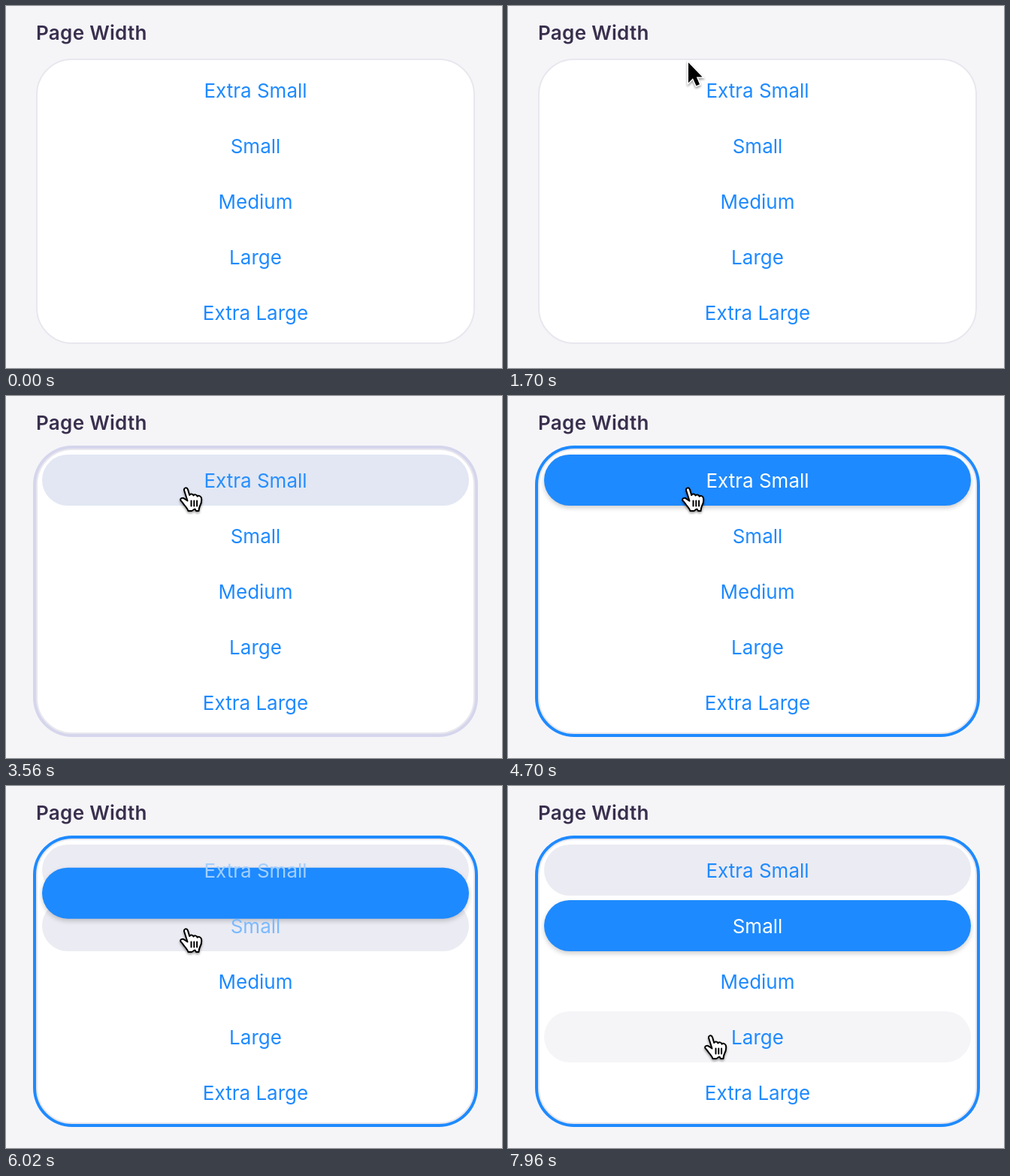
Write an HTML page that moves like this. It is 660 by 482 pixels and loops after 8 s.

```html
<!DOCTYPE html>
<html lang="en">
<head>
<meta charset="utf-8">
<title>Page Width</title>
<style>
html, body { margin: 0; width: 100%; height: 100%; overflow: hidden; background: #f5f5f8; }
body { position: relative; font: 26px/68px Inter, sans-serif; }
h1 { position: absolute; left: 40px; top: 2px; margin: 0; font-size: 26px; font-weight: 600; letter-spacing: .3px; color: #392f4d; white-space: nowrap; }
#panel { position: absolute; left: 40px; top: 70px; width: 584px; height: 380px; box-sizing: border-box; background: #fff; border: 2px solid #e8e7ee; border-radius: 48px; }
.row, .label, #pill { position: absolute; left: 48px; width: 568px; height: 68px; border-radius: 34px; text-align: center; }
#pill { top: 78px; background: #1e8aff; box-shadow: 0 3px 6px rgba(0, 0, 0, .2); }
svg { position: absolute; left: 0; top: 0; }
#cursor { filter: drop-shadow(0 2px 1.5px rgba(0, 0, 0, .4)); }
</style>
</head>
<body>
<h1>Page Width</h1>
<div id="panel"></div>
<svg width="660" height="482">
  <g id="cursor">
    <path id="arrow" d="M1 2V29L7 23 11.5 33 16 31 11.8 21.3H19.5Z" fill="#000" stroke="#fff" stroke-width="3" paint-order="stroke"/>
    <g id="hand" transform="translate(-8)" stroke="#000" stroke-width="2" stroke-linejoin="round" stroke-linecap="round">
      <path fill="#fff" d="M10.5 18.5L6.2 5C5 1 9.7-.2 11 3.5L13.2 11C14 8.8 17.8 9 18.4 11.5C19.6 9.6 23 10 23.6 12.7C25 11 28.5 12 29 15C29.7 19 29 22 27 25.5C25.8 28 25.8 29.5 25.5 32H22L20.5 29.5C18.5 29.5 17.5 32 16 32H11.5C11 29.5 9 27.5 7 25C5 22.5 3.5 20 1.5 18.2C0 15.5 4 13.5 6.2 15.7Z"/>
      <path fill="none" d="M15.5 18.5v7M19.3 18.5v7M23.1 18.5v7"/>
    </g>
  </g>
</svg>
<script>
const LOOP = 8000, PITCH = 74, BLUE = '#1e8aff';
const $ = id => document.getElementById(id);
const svg = document.querySelector('svg');

function add(cls, top, text = '') {
  const el = document.createElement('div');
  el.className = el.id = cls;
  if (cls !== 'pill') el.removeAttribute('id');
  el.style.top = top + 'px';
  el.textContent = text;
  svg.before(el);
  return el;
}
const names = ['Extra Small', 'Small', 'Medium', 'Large', 'Extra Large'];
const rows = names.map((_, i) => add('row', 78 + i * PITCH));
const pill = add('pill', 78);
const labels = names.map((name, i) => add('label', 79 + i * PITCH, name));

// Pointer tip: time, x, y
const path = [
  [1180, 239, -38], [1700, 239, 73], [2000, 239, 104], [2480, 239, 114],
  [2600, 239, 119], [2810, 239, 119], [2840, 239, 121], [4690, 239, 121],
  [5200, 239, 189], [6710, 239, 189], [7060, 246, 219], [7540, 267, 325],
  [7960, 269, 331]
];
// Pointer over each row: enter, leave, press
const visits = [[1720, 9e3, 3440], [4930, 7060, 5820], [7100, 7380, 9e3], [7410, 9e3, 9e3]];
const FIRST_PICK = 3540, SECOND_PICK = 5920;

const clamp = v => Math.min(1, Math.max(0, v));
const ramp = (t, start, length) => clamp((t - start) / length);

// The CSS "ease" curve
function ease(x) {
  let lo = 0, hi = 1;
  for (let i = 0; i < 20; i++) {
    const s = (lo + hi) / 2;
    if (.75 * s * (1 - s) + s ** 3 < x) lo = s; else hi = s;
  }
  return .3 * lo * (1 - lo) ** 2 + 3 * lo * lo * (1 - lo) + lo ** 3;
}

function slope(i, k) {
  if (i < 1 || i > path.length - 2) return 0;
  const rate = j => (path[j + 1][k] - path[j][k]) / (path[j + 1][0] - path[j][0]);
  const a = rate(i - 1), b = rate(i);
  return a * b > 0 ? 2 * a * b / (a + b) : 0;
}

// Smooth interpolation without overshoot
function pointer(t, k) {
  const last = path.length - 1;
  if (t >= path[last][0]) return path[last][k];
  const i = Math.max(0, path.findIndex(p => p[0] > t) - 1);
  const a = path[i], b = path[i + 1], d = b[0] - a[0], s = ramp(t, a[0], d);
  return a[k] + (b[k] - a[k]) * s * s * (3 - 2 * s)
    + d * s * (1 - s) * (slope(i, k) * (1 - s) - slope(i + 1, k) * s);
}

const mix = (a, b, p) => `color-mix(in srgb, ${b} ${p * 100}%, ${a})`;

function draw(t) {
  const pick = ease(ramp(t, FIRST_PICK, 400));
  const move = ease(ramp(t, SECOND_PICK, 400));

  const ring = mix('#dcd9eb', BLUE, pick);
  $('panel').style.boxShadow = `0 0 0 4px ${mix('transparent', ring, ramp(t, 1720, 200))}`;

  visits.forEach(([enter, leave, press], i) => {
    rows[i].style.opacity = ramp(t, enter, 120) * (1 - ramp(t, leave, 120));
    rows[i].style.background = mix('#f5f5f8', '#ebebf3', ramp(t, press, 100));
  });

  pill.style.opacity = pick;
  pill.style.transform = `translateY(${move * PITCH}px)`;
  labels.forEach((label, i) => {
    const white = i === 0 ? pick * (1 - move) : i === 1 ? move : 0;
    label.style.color = mix(BLUE, '#fff', white);
  });

  const y = pointer(t, 2), overRow = t > 1700 && y >= 78;
  $('cursor').setAttribute('transform', `translate(${pointer(t, 1)} ${y})`);
  $('cursor').style.display = t < 1180 ? 'none' : '';
  $('arrow').style.display = overRow ? 'none' : '';
  $('hand').style.display = overRow ? '' : 'none';
}

const start = performance.now();
function tick() {
  draw((performance.now() - start) % LOOP);
  requestAnimationFrame(tick);
}
tick();
</script>
</body>
</html>
```
